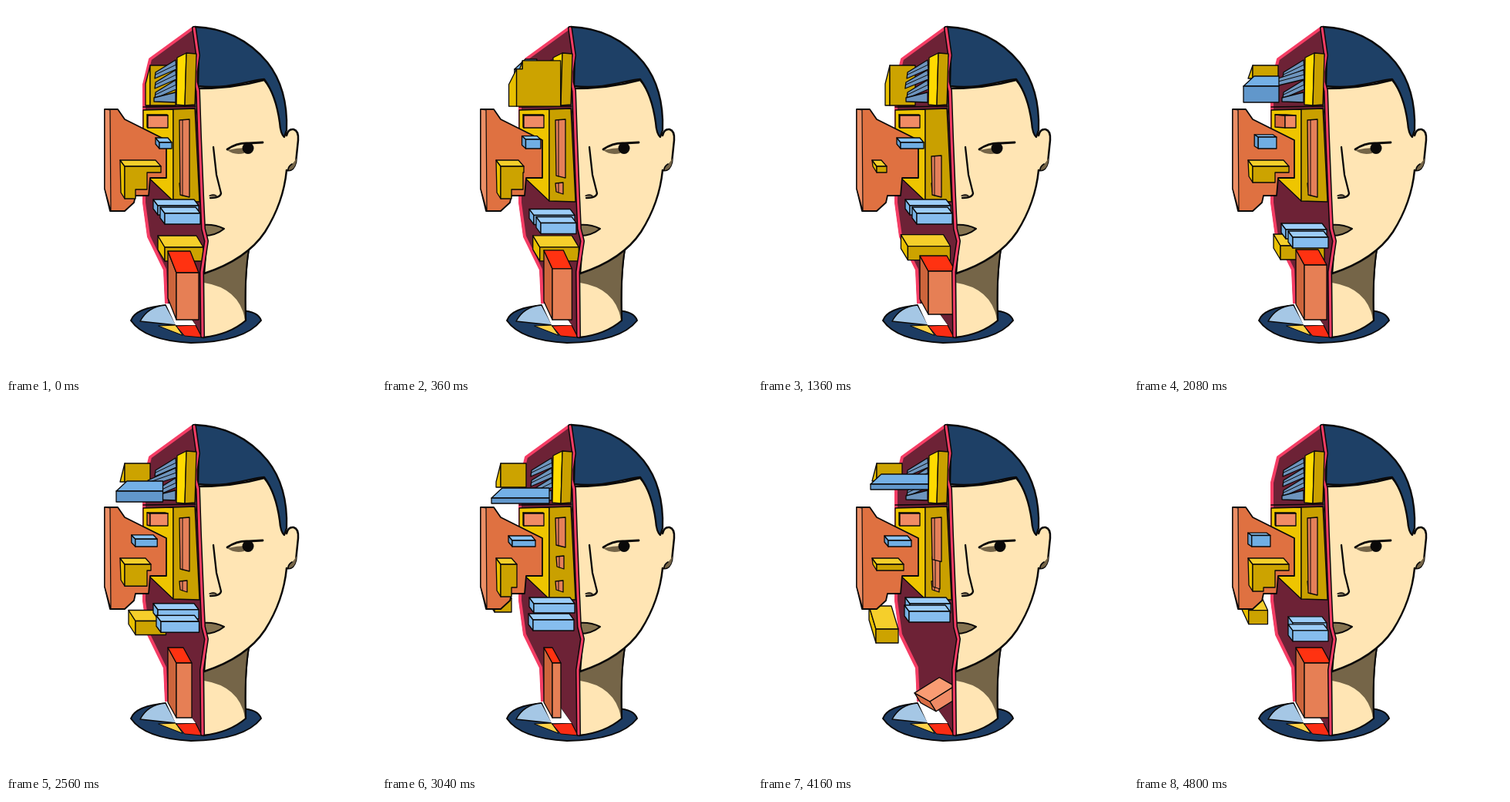
An HTML page with a canvas that plays this animation: 480x480 px, repeating every 4840 ms.

```html
<!DOCTYPE html>
<html lang="en">
<head>
<meta charset="utf-8">
<title>Open head</title>
<style>
html, body { margin: 0; width: 100%; height: 100%; overflow: hidden; background: #fff; }
canvas { display: block; width: 480px; height: 480px; }
</style>
</head>
<body>
<canvas id="stage" width="480" height="480"></canvas>
<script>
const ctx = document.getElementById('stage').getContext('2d');
const LOOP = 4840, STEP = 40;
const INK = '#0a0909', PINK = '#f53d65', NAVY = '#1e4066', SKIN = '#ffe5b4', SHADE = '#756548';
const gold = { top: '#f5cf2b', side: '#e8c000', front: '#cca300' };
const blue = { top: '#8cc4f2', side: '#659fd2', front: '#70aee3' };
const sky = { top: '#9ccdf8', side: '#78b3e6', front: '#86bdee' };
const steel = { top: '#74b0e6', side: '#6197cb', front: '#6197cb' };
const coral = { top: '#ff3211', side: '#cd653c', front: '#e67f55' };
const salmon = { top: '#f99c73', side: '#d96c43', front: '#f08b65' };

// Eased 0 to 1 between a and b
function ramp(t, a, b) {
  const u = Math.max(0, Math.min(1, (t - a) / (b - a)));
  return u * u * (3 - 2 * u);
}

// Swell of height 1 around mid
function pulse(t, mid, reach) {
  const u = Math.min(1, Math.abs(t - mid) / reach);
  return Math.cos(u * Math.PI / 2) ** 2;
}

function paint(path, fill, width = 1.3, ink = INK) {
  if (fill) { ctx.fillStyle = fill; ctx.fill(path); }
  if (width) { ctx.lineWidth = width; ctx.strokeStyle = ink; ctx.stroke(path); }
}
const shape = (d, fill, width, ink) => paint(new Path2D(d), fill, width, ink);
const poly = (pts, fill, width, ink) => shape('M' + pts.join(' ') + 'Z', fill, width, ink);

// Front rectangle with depth (dx, dy) towards the upper left
function box(x, y, w, h, dx, dy, c) {
  const r = x + w, b = y + h;
  if (dx > 0) poly([x, y, x - dx, y - dy, x - dx, b - dy, x, b], c.side);
  poly([x, y, r, y, r - Math.max(dx, 0), y - dy, x - dx, y - dy], c.top);
  poly([x, y, r, y, r, b, x, b], c.front);
}

function body() {
  shape('M162 408Q168 391 210 388L305 395Q327 396 331 408Q309 436 240 437Q180 434 162 408Z', '#1d3c63', 2);
  shape('M174 409Q184 390 207 388L221 414Z', '#a5c7e5', 1.5);
  poly([198,415, 220,414, 229,427], '#ffd24a', 1);
  poly([221,415, 246,414, 254,430, 232,428], '#fa2c14', 1);
  shape('M256 344L315 314Q309 352 311 408Q290 426 256 430Z', SKIN, 2.3);
  shape('M257 346L315 316Q309 352 310 406Q302 366 257 359Z', SHADE, 0);
  shape('M315 316Q309 352 311 408', null, 2);
}

function cavity() {
  shape('M242 28L187 68L178 102L178 255L184 299L205 342L207 386L226 386L246 414L254 429L254 345L260 306L256 290L253 230L246 130L249 62Z', '#6d2236', 1);
  shape('M242 29L187 69L179 102L179 255L185 299L206 342L208 385', null, 4, PINK);
  poly([207,386, 226,386, 246,414, 220,414], '#fff', 0);
}

function strip(x, w, top, end) {
  poly([x, top, x + w, top - 1, x + w, end, x + 1, end - 3], '#e5805a');
  shape(`M${x + 4} ${top}V${end - 2}`, null, 1);
}

function unit(t) {
  poly([178,135, 217,134, 217,253, 178,216], '#eec500');
  poly([217,134, 245,133, 251,254, 217,253], '#c9a000');
  const late = pulse(t, 4160, 640);
  const cut = pulse(t, 720, 640) + pulse(t, 3040, 960) + .7 * late;
  strip(225, 10, 230, 244);
  strip(226, 10, 198, 214 + 26 * late);
  strip(225, 13, 148 + 47 * pulse(t, 1360, 640), 248 - 62 * cut);
  const turn = 12 * pulse(t, 2080, 720);
  box(184 + turn, 142, 26 - turn, 16, 1 + turn, 1, salmon);
}

function tray(t) {
  const slide = ramp(t, 0, 2080), out = ramp(t, 2080, 3040), drop = pulse(t, 4160, 1120);
  box(206 - 16 * slide - 44 * out + 7 * drop, 313 - 2 * slide - 59 * out + 40 * drop,
    50 + 7 * slide - 35 * out + 7 * drop, 18, 9, 15 - 2 * out + 17 * drop, gold);
}

function bars(t) {
  const sink = 31 * (pulse(t, 720, 640) + pulse(t, 2080, 720) + .8 * pulse(t, 4800, 640));
  const back = ramp(t, 2080, 3040) - ramp(t, 4160, 4800);
  const end = 9 * ramp(t, 4160, 4800);
  box(197 + end, 259 + sink, 53 - end, 12, 6, 8, sky);
  box(206 - 10 * back, 269 + sink + 11 * pulse(t, 3040, 960), 46 + 7 * back, 14, 6, 8, sky);
}

function pillar(t) {
  const start = pulse(t, 0, 700), wide = pulse(t, 1360, 640), tip = pulse(t, 4160, 640);
  const w = 29 - 9 * pulse(t, 720, 640) + 6 * wide - 18 * pulse(t, 3040, 960) + 5 * ramp(t, 4160, 4800);
  const y = 336 + 10 * start + 8 * wide, bottom = 407 - 7 * wide;
  ctx.save();
  ctx.clip(new Path2D('M180 300H256V430H180Z'));
  ctx.translate(221 + 2 * tip, y + 50 * tip);
  ctx.rotate(-.56 * tip);
  box(0, 0, w + 9 * tip, (bottom - y) * (1 - tip) + 15 * tip, 11, 20 + 8 * start, tip > .5 ? salmon : coral);
  ctx.restore();
}

function crate(t) {
  const big = pulse(t, 720, 640), lift = ramp(t, 1360, 2080), hide = ramp(t, 4160, 4800);
  if (hide > .95) return;
  const x = 187 - 16 * ramp(t, 0, 1360) - 17 * lift - 24 * big + 68 * hide;
  const r = x + (33 + 60 * big) * (1 - hide);
  const y = 77 - 15 * big;
  const b = y + 52 + 18 * big - 35 * lift + 14 * pulse(t, 3040, 960) + 6 * ramp(t, 3040, 4160);
  const n = y + 27 * big, notch = x + 19 * big, d = 6 + 10 * big;
  poly([x, n, x - d, Math.min(b, n + 24 - 10 * big), x - d, b, x, b], gold.side);
  if (big > .1) poly([notch, y, x + 3, y + 14, x, n, notch, n], gold.top);
  poly([notch, y, r, y, r, b, x, b, x, n, notch, n], gold.front);
}

function shelf(t) {
  const reach = 22 * pulse(t, 2080, 900);
  for (let i = 0; i < 3; i++) {
    const y = 70 + i * 13, x = 193 - (i === 1 ? reach : 0);
    poly([x, y + 24, x + 1, y + 16, 220, y, 221, y + 12], '#6d94bd');
    shape(`M${x + 1} ${y + 19}L221 ${y + 6}`, null, 1);
  }
  poly([192,119, 220,112, 220,125, 192,124], '#6d94bd');
  poly([222,67, 234,61, 232,129, 221,128], '#ffda00');
  poly([234,61, 247,62, 245,128, 232,129], '#c9a000');
  shape('M178 131L246 130', null, 1.5);
}

function drawer(t) {
  const early = pulse(t, 720, 640), later = ramp(t, 1360, 2080) - ramp(t, 4160, 4800);
  const wide = ramp(t, 2080, 3040) - ramp(t, 4160, 4800);
  const out = early + later;
  if (out < .05) return;
  box(192 - 50 * out + 4 * wide * (1 - pulse(t, 3040, 960)), 82 + 22 * later + 18 * pulse(t, 3040, 960),
    29 + 17 * later + 29 * wide, 6 + 24 * early + 15 * later - 14 * wide, -14, 13, steel);
}

function door() {
  poly([128,134, 145,134, 154,147, 208,174, 208,223, 187,223, 185,246, 168,246, 166,255, 154,266, 135,266, 128,237], '#df7141', 1.8);
  poly([128,134, 135,135, 136,266, 128,237], '#ec8f66', 1.2);
}

function plug(t) {
  const tall = pulse(t, 720, 640) + .7 * pulse(t, 2080, 720) + .65 * pulse(t, 4800, 640);
  box(199 - 14 * ramp(t, 0, 1360) - 16 * ramp(t, 1360, 3040) - 25 * tall, 177 - 10 * tall,
    16 + 14 * ramp(t, 0, 720) - 9 * tall, 8 + 10 * tall, 5, 6 - 4 * tall, blue);
}

function steps(t) {
  const x = 154, y = 208;
  const r = 201 - 34 * ramp(t, 0, 720) + 34 * ramp(t, 1360, 2080) - 26 * pulse(t, 3040, 960) - 12 * pulse(t, 4160, 640);
  const b = 250 - 34 * ramp(t, 720, 1360) + 13 * pulse(t, 2080, 720) + 34 * pulse(t, 3040, 960) + 27 * pulse(t, 4800, 640);
  const x1 = Math.min(r, 168), x2 = Math.min(r, 183), y2 = Math.min(b, 238), y3 = Math.min(b, 216);
  poly([148,200, x, y, x, b, 149, b - 8], gold.side);
  poly([148,200, r - 7, 200, r, y, x, y], gold.top);
  poly([x, y, r, y, r, y3, x2, y3, x2, y2, x1, y2, x1, b, x, b], gold.front);
}

function face(t) {
  shape('M248 107Q295 107 335 96Q352 116 358 160L364 168Q366 159 373 160Q380 162 379 174L376 203Q373 215 364 213Q360 255 336 293Q312 329 257 347L260 307L255 285Z', SKIN, 2.5);
  shape('M366 209Q372 206 377 197Q376 214 365 213Z', SHADE, 0);
  shape('M366 213Q366 208 371 205', null, 1.7);
  shape('M245 27Q302 29 339 73Q366 107 364 161L361 170Q356 166 355 151Q350 115 335 95C312 97 292 108 249 104L250 62Z', NAVY, 2.3);
  shape('M287 187Q300 184 312 184L309 191Q296 194 287 187Z', SHADE, 0);
  shape('M287 186Q300 177 315 178L333 177', null, 2.8);
  ctx.beginPath();
  ctx.arc(314 - 4 * pulse(t, 1360, 300), 184.5, 7.5, 0, 7);
  ctx.fillStyle = INK;
  ctx.fill();
  shape('M269 183L273 219L279 243Q278 249 265 249', null, 2.3);
  shape('M264 246Q269 243 273 246Z', SHADE, 1);
  shape('M256 284Q271 283 283 289Q272 298 257 298Z', '#857350', 2);
  const seam = 'M244 29L249 64L246 85L246 99L249 110L251 170L254 245L256 289L260 305L254 345L255 428';
  shape(seam, null, 6);
  shape(seam, null, 3, PINK);
}

function draw(t) {
  ctx.fillStyle = '#fff';
  ctx.fillRect(0, 0, 480, 480);
  ctx.lineJoin = ctx.lineCap = 'round';
  body();
  cavity();
  for (const part of [unit, tray, bars, pillar, face]) part(t);
  const front = pulse(t, 720, 640) > .3;
  for (const part of front ? [shelf, drawer, crate] : [crate, shelf, drawer]) part(t);
  door();
  plug(t);
  steps(t);
}

function tick() {
  const t = performance.now() % LOOP;
  draw(Math.floor(t / STEP) * STEP);
  requestAnimationFrame(tick);
}
tick();
</script>
</body>
</html>
```
